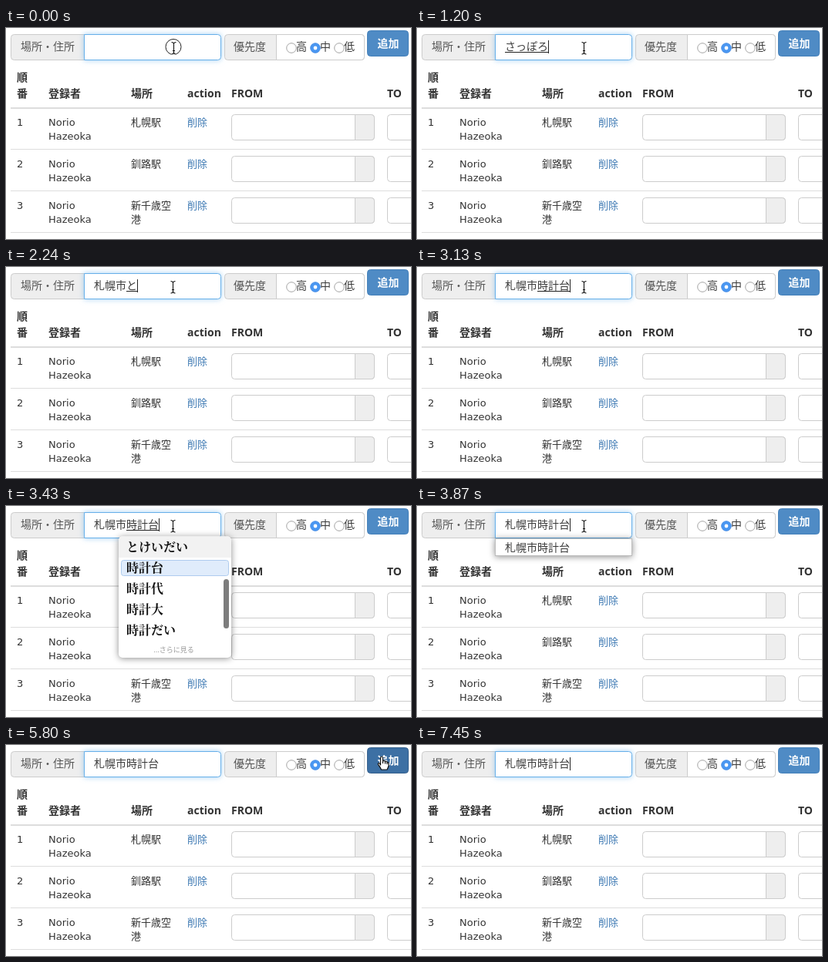
An HTML page that plays this animation: 525x274 px, repeating every 7.74 s.

```html
<!DOCTYPE html>
<html lang="ja">
<head>
<meta charset="utf-8">
<title>場所の追加</title>
<style>
html, body { margin: 0; width: 100%; height: 100%; overflow: hidden; background: #fff; }
svg { display: block; width: 525px; height: 274px; }
text { white-space: pre; font: 14px "Noto Sans CJK JP", "Noto Sans", sans-serif; fill: #555; }
.head { font: bold 14px "Open Sans", "Noto Sans CJK JP", sans-serif; fill: #333; }
.cell { font: 13px "DejaVu Sans", "Noto Sans CJK JP", sans-serif; fill: #333; }
.link { font-size: 13px; fill: #3d79b3; }
.dark { fill: #3c3c3c; }
.btn { font-weight: bold; fill: #fff; }
.cand { font: bold 16px "Noto Serif CJK JP", "Noto Sans CJK JP", serif; fill: #111; }
.more { font-size: 9px; fill: #999; text-anchor: middle; }
.focus { filter: drop-shadow(0 0 3.5px rgba(102, 175, 233, .6)); }
.float { filter: drop-shadow(0 1px 4px rgba(0, 0, 0, .45)); }
</style>
</head>
<body>
<svg id="stage" viewBox="0 0 525 274"></svg>
<script>
const LOOP = 7740;
const stage = document.getElementById('stage');

function add(parent, tag, attrs, content) {
  const el = document.createElementNS('http://www.w3.org/2000/svg', tag);
  for (const key in attrs) el.setAttribute(key, attrs[key]);
  if (content) el.textContent = content;
  parent.append(el);
  return el;
}
const group = (parent = stage) => add(parent, 'g', {});
const label = (parent, x, y, content, cls = '') => add(parent, 'text', { x, y, class: cls }, content);
const box = (parent, x, y, width, height, fill, stroke = 'none', rx = 0) =>
  add(parent, 'rect', { x, y, width, height, fill, stroke, rx });

// Box with only its right corners rounded
const rightBox = (x, y, w, h, fill, stroke, cls = '') => add(stage, 'path', {
  d: `M${x} ${y}h${w - 4}a4 4 0 0 1 4 4v${h - 8}a4 4 0 0 1-4 4h${4 - w}z`,
  fill, stroke, class: cls
});
const show = (el, on) => { el.style.display = on ? '' : 'none'; };

// Table
const heads = [[14, 69, '順'], [14, 90, '番'], [55, 90, '登録者'], [162, 90, '場所'],
  [235, 90, 'action'], [292, 90, 'FROM'], [494, 90, 'TO']];
heads.forEach(([x, y, s]) => label(stage, x, y, s, 'head'));
box(stage, 6, 103, 519, 2, '#ddd');

[['札幌駅'], ['釧路駅'], ['新千歳空', '港']].forEach((place, i) => {
  const y = 127 + 54 * i;
  label(stage, 14, y, String(i + 1), 'cell');
  label(stage, 55, y, 'Norio', 'cell');
  label(stage, 55, y + 18, 'Hazeoka', 'cell');
  place.forEach((s, n) => label(stage, 162, y + 18 * n, s, 'cell'));
  label(stage, 235, y, '削除', 'link');
  for (const x of [292.5, 494.5]) {
    box(stage, x, y - 14.5, 185, 33, '#fff', '#ccc', 4);
    rightBox(x + 160, y - 14.5, 25, 33, '#eee', '#ccc');
  }
  box(stage, 6, y + 30, 519, 1, '#ddd');
});

// Form row
box(stage, 6.5, 8.5, 110, 33, '#eee', '#ccc', 4);
label(stage, 19, 29, '場所・住所');
rightBox(101.5, 8.5, 177, 33, '#fff', '#66afe9', 'focus');
box(stage, 283.5, 8.5, 181, 33, '#eee', '#ccc', 4);
label(stage, 295, 29, '優先度');
rightBox(350.5, 8.5, 114, 33, '#fff', '#ccc');
['高', '中', '低'].forEach((s, i) => {
  const cx = 370 + 31 * i, on = i === 1;
  add(stage, 'circle', { cx, cy: 26, r: 6.3, fill: on ? '#4a97f2' : '#fff', stroke: on ? '#4189e4' : '#999', 'stroke-width': .9 });
  if (on) add(stage, 'circle', { cx, cy: 26, r: 2.4, fill: '#fff' });
  label(stage, cx + 6, 29, s, 'dark');
});
const button = box(stage, 468.5, 3.5, 53, 33, '#4f8bc5', '#427fb9', 4);
label(stage, 481.5, 25, '追加', 'btn');

// Text field
const typed = label(stage, 114, 29, '', 'dark');
const underline = box(stage, 114, 31, 0, 1, '#222');
const caret = box(stage, 114, 16, 1, 17, '#222');

function candidates(x, w, words) {
  const g = group();
  box(g, x, 39.5, w, 157.5, '#fff', 'none', 5).setAttribute('class', 'float');
  add(g, 'path', { d: `M${x} 67V44.5a5 5 0 0 1 5-5h${w - 10}a5 5 0 0 1 5 5v22.5z`, fill: '#f2f2f2' });
  box(g, x + 3.5, 70.5, w - 7, 20, '#e0ecfb', '#aecbee', 3);
  words.forEach((s, i) => label(g, x + 10, 58.5 + 27 * i, s, 'cand'));
  box(g, x + w - 10, 95, 7, 64, '#7d7d7d', 'none', 3.5);
  label(g, x + w / 2 - 1.5, 190, '...さらに見る', 'more');
  return g;
}
const lists = [
  candidates(104, 162, ['さっぽろし', '札幌市', '札幌し', 'サッポロし', 'さっぽろし']),
  candidates(146, 146, ['とけいだい', '時計台', '時計代', '時計大', '時計だい'])
];

const history = group();
box(history, 101.5, 42.5, 177, 22, '#fff', '#bbb').setAttribute('class', 'float');
label(history, 114, 59, '札幌市時計台', 'dark');

// Pointers, each drawn around its own hot spot
const ring = add(stage, 'circle', { cx: 217, cy: 24.5, r: 10, fill: '#fff', 'fill-opacity': .8, stroke: '#222' });
function pointer(d, fill, line, halo) {
  const g = group();
  if (halo) add(g, 'path', { d, fill: 'none', stroke: '#fff', 'stroke-width': 3 });
  add(g, 'path', { d, fill, stroke: '#111', 'stroke-width': line, 'stroke-linejoin': 'round' });
  return g;
}
const pointers = {
  beam: pointer('M-3-7.5Q0-7.5 0-5V5.5Q0 8 -3 8M3-7.5Q0-7.5 0-5M0 5.5Q0 8 3 8M-1.5 3.5H1.5', 'none', 1.1, true),
  arrow: pointer('M0 0V14L3.3 11 5.6 16 8 15 5.8 10.2H10Z', '#111', .8, true),
  hand: pointer('M-3 2V-7Q-3-9-1.5-9T0-7V-3Q1.5-4.5 3-2.5 4.5-3.5 5.5-1.5 7.5-2 7.5 0V3Q7 5 5.5 8H-2Q-3 5-6 1.5-6.5-1-4.5-.5ZM0-3V0M3-2.5V.5M5.5-1.5V1', '#fff', 1.2)
};

// time, settled text, text being composed, candidate list, history box
const steps = [
  [0, '', ''],
  [150, '', 'さ'],
  [450, '', 'さp'],
  [750, '', 'さっp'],
  [1050, '', 'さっぽ'],
  [1200, '', 'さっぽろ'],
  [1350, '', 'さっぽろし'],
  [1500, '', '札幌市'],
  [1650, '', '札幌市', 0],
  [1800, '札幌市', ''],
  [1940, '札幌市', '', -1, true],
  [2240, '札幌市', 'と'],
  [2680, '札幌市', 'とk'],
  [2830, '札幌市', 'とけ'],
  [2980, '札幌市', 'とけい'],
  [3130, '札幌市', '時計台'],
  [3430, '札幌市', '時計台', 1],
  [3570, '札幌市時計台', ''],
  [3870, '札幌市時計台', '', -1, true],
  [4020, '札幌市時計台', '']
];
const blinks = [4610, 5200, 5800, 6400, 7000, 7450];

const widthOf = s => [...s].reduce((w, c) => w + (c < '\u0080' ? 8 : 14), 0);

function drawPointer(t) {
  const k = Math.max(0, Math.min(7, Math.floor((t - 4606) / 148.6)));
  const p = k / 7, e = p * p * (3 - 2 * p);
  const x = (t < 150 ? 217 : 216) + 272 * e;
  const y = 25.5 - 1.5 * e + 17 * Math.sin(Math.PI * e);
  const hover = x > 468 && y < 37 && t < 6400;
  const kind = hover ? 'hand' : x < 279 && y < 42 ? 'beam' : 'arrow';
  for (const name in pointers) {
    show(pointers[name], name === kind && t < 6400);
    pointers[name].setAttribute('transform', `translate(${Math.round(x) + .5} ${Math.round(y)})`);
  }
  button.setAttribute('fill', hover ? '#3d70a4' : '#4f8bc5');
  button.setAttribute('stroke', hover ? '#345f8c' : '#427fb9');
}

function draw(t) {
  const [, settled, composing, list = -1, past = false] = steps.findLast(s => s[0] <= t);
  const start = 114 + widthOf(settled), width = widthOf(composing);
  typed.textContent = settled + composing;
  underline.setAttribute('x', start);
  underline.setAttribute('width', width);
  caret.setAttribute('x', start + width);
  show(caret, t >= 150 && blinks.filter(b => b <= t).length % 2 === 0);
  lists.forEach((g, i) => show(g, i === list));
  show(history, past);
  show(ring, t < 150);
  drawPointer(t);
}

const began = performance.now();
function tick() {
  draw((performance.now() - began) % LOOP);
  requestAnimationFrame(tick);
}
tick();
</script>
</body>
</html>
```
